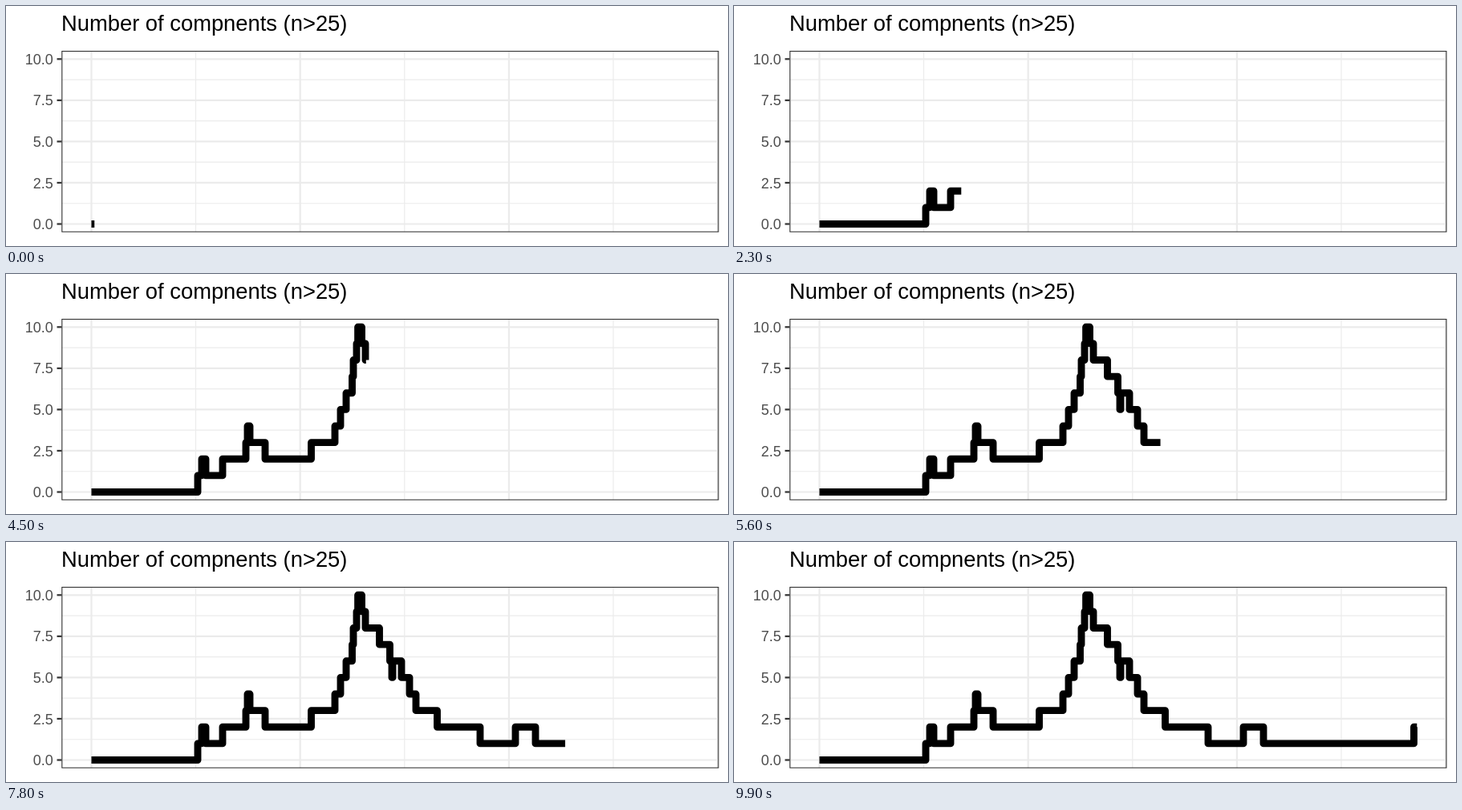
These frames come from a looping animation (900 by 300 pixels, 10 s). An HTML page with a canvas:

```html
<!DOCTYPE html>
<html lang="en">
<head>
<meta charset="utf-8">
<title>Number of compnents</title>
<style>
  html, body { margin: 0; width: 900px; height: 300px; overflow: hidden; background: #fff; }
  canvas, svg { position: absolute; left: 0; top: 0; display: block; }
  text { font-family: "Liberation Sans", Arial, sans-serif; }
  .title { font-size: 27.35px; fill: #000; }
  .label { font-size: 18px; fill: #4d4d4d; text-anchor: end; }
</style>
</head>
<body>
<canvas id="plot" width="900" height="300"></canvas>
<svg id="labels" width="900" height="300">
  <text class="title" x="69" y="31">Number of compnents (n&gt;25)</text>
</svg>
<script>
const ctx = document.getElementById('plot').getContext('2d');
const labels = document.getElementById('labels');

const LEFT = 69.24, RIGHT = 888.54, TOP = 56, BOTTOM = 282.81;
const FRAME_MS = 100, FRAMES = 100;
const THIN = 1.11, THICK = 2.22;

// Each axis is padded by 5% of its data range on both sides.
const span = (RIGHT - LEFT) / 1.1;
const x0 = LEFT + span * 0.05;
const step = span / (FRAMES - 1);
const unit = (BOTTOM - TOP) / 11;
const yOf = v => BOTTOM - (v + 0.5) * unit;

// The count goes up by one at each birth and down by one at each death.
const births = [239, 244, 270, 299, 301, 380.5, 410, 417, 424, 431.5, 433, 437, 438.6, 482, 635, 847.5];
const deaths = [249, 304, 323, 443.5, 448, 465.5, 478.5, 481, 493, 503, 511, 537.5, 591, 660];
const events = [
  ...births.map(x => ({ x, change: 1 })),
  ...deaths.map(x => ({ x, change: -1 }))
].sort((a, b) => a.x - b.x);

function segment(x1, y1, x2, y2, color, width) {
  ctx.strokeStyle = color;
  ctx.lineWidth = width;
  ctx.beginPath();
  ctx.moveTo(x1, y1);
  ctx.lineTo(x2, y2);
  ctx.stroke();
}

function gridLines(offset, width) {
  for (let i = offset; i <= 4; i++) {
    const x = x0 + i * 260.2, y = yOf(i * 2.5);
    segment(LEFT, y, RIGHT, y, '#ebebeb', width);
    segment(x, TOP, x, BOTTOM, '#ebebeb', width);
  }
}

function curve(end) {
  let level = 0;
  ctx.strokeStyle = '#000';
  ctx.lineWidth = 8.89;
  ctx.lineJoin = 'round';
  ctx.beginPath();
  ctx.moveTo(x0, yOf(level));
  for (const { x, change } of events) {
    if (x > end) break;
    ctx.lineTo(x, yOf(level));
    level += change;
    ctx.lineTo(x, yOf(level));
  }
  ctx.lineTo(end, yOf(level));
  ctx.stroke();
}

function draw(frame) {
  ctx.fillStyle = '#fff';
  ctx.fillRect(0, 0, 900, 300);

  ctx.save();
  ctx.beginPath();
  ctx.rect(LEFT, TOP, RIGHT - LEFT, BOTTOM - TOP);
  ctx.clip();
  gridLines(0.5, THIN);
  gridLines(0, THICK);
  curve(Math.min(x0 + span, x0 + step * (frame + 0.5)));
  ctx.strokeStyle = '#333';
  ctx.lineWidth = THICK;
  ctx.lineJoin = 'miter';
  ctx.strokeRect(LEFT, TOP, RIGHT - LEFT, BOTTOM - TOP);
  ctx.restore();

  for (let v = 0; v <= 10; v += 2.5) {
    segment(LEFT - 5.73, yOf(v), LEFT, yOf(v), '#333', THICK);
  }
}

function addLabel(v) {
  const label = document.createElementNS('http://www.w3.org/2000/svg', 'text');
  label.setAttribute('class', 'label');
  label.setAttribute('x', 58.9);
  label.setAttribute('y', yOf(v) + 6.6);
  label.textContent = v.toFixed(1);
  labels.append(label);
}

for (let v = 0; v <= 10; v += 2.5) addLabel(v);

const start = performance.now();
let shown = -1;

function tick() {
  const frame = Math.floor((performance.now() - start) / FRAME_MS) % FRAMES;
  if (frame !== shown) draw(shown = frame);
  requestAnimationFrame(tick);
}
tick();
</script>
</body>
</html>
```
